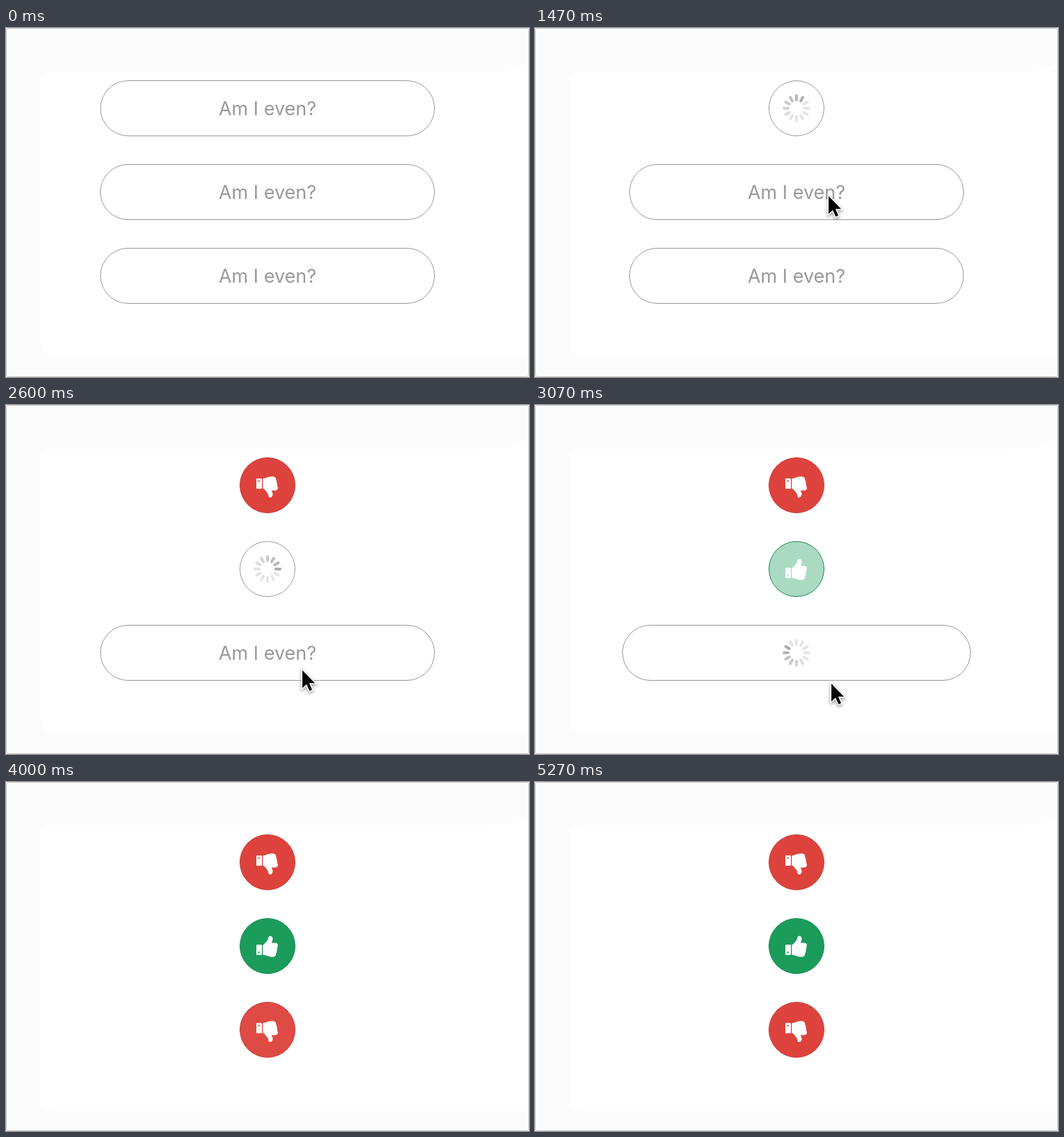
An HTML page with a canvas that plays this animation: 750x500 px, repeating every 5.34 s.

```html
<!DOCTYPE html>
<html lang="en">
<head>
<meta charset="utf-8">
<title>Am I even?</title>
<style>
  html, body { margin: 0; width: 100%; height: 100%; overflow: hidden; background: #fff; }
  canvas { display: block; }
</style>
</head>
<body>
<canvas id="stage" width="750" height="500"></canvas>
<script>
const ctx = document.getElementById('stage').getContext('2d');
const LOOP = 5340;
const GRAY = '#999999';
const RED = { fill: '221,67,60', border: '#c93a34', down: true };
const GREEN = { fill: '27,156,91', border: '#178a50', down: false };

// grow: extra width just before the button collapses; phase: spinner head offset
const buttons = [
  { y: 115, press: 1030, done: 1950, grow: 40, phase: 8.2, result: RED },
  { y: 235, press: 1990, done: 2960, grow: 0, phase: 8.2, result: GREEN },
  { y: 355, press: 2860, done: 3715, grow: 49, phase: 9.8, result: RED }
];

// time, x, y of the pointer tip
const pointerPath = [
  [600, 419, 45], [735, 420, 94], [860, 420, 94], [1000, 419, 114], [1150, 419, 114],
  [1400, 421, 232], [1500, 421, 243], [2150, 421, 243], [2550, 425, 380],
  [2950, 425, 380], [3330, 425, 460], [3400, 425, 500]
];

const arrow = new Path2D('M0 0V25.5L6 20L10.2 29.5L14 28L9.8 18.5H18Z');
const cuff = new Path2D('M-14.8-2H-9.2Q-8-2-8-.8V11.6Q-8 12.8-9.2 12.8H-14.8Q-16 12.8-16 11.6V-.8Q-16-2-14.8-2Z' +
  'M-11.1 9.1A1.2 1.2 0 1 0-13.5 9.1A1.2 1.2 0 1 0-11.1 9.1Z');
const hand = new Path2D('M-6.7-.9Q-6.7-2-5.6-2.1C-4.4-2.5-2-5.8-.2-7.9C1.2-9.2 1-12 1.9-13.4' +
  'Q2.4-14.4 3.2-14.4C6.8-14.2 7.5-12 7.5-9.5C7.5-7.2 6-6 5.8-4.5H11.2Q14.9-4.2 14.9-.8Q14.9 1 13.8 2.1' +
  'Q14.7 4.8 13.3 6.3Q13.8 9 12.2 10.4C12.4 14 10.5 15.4 7.5 15.4H5C1.5 15.4-2.5 12.9-5.6 12.8Q-6.7 12.6-6.7 11.6Z');

const clamp = v => Math.min(1, Math.max(0, v));
const smooth = v => { v = clamp(v); return v * v * (3 - 2 * v); };
const mix = (a, b, k) => a + (b - a) * k;

function drawBackground() {
  ctx.fillStyle = '#fcfcfc';
  ctx.fillRect(0, 0, 750, 500);
  ctx.fillStyle = '#fff';
  ctx.fill(new Path2D('M50 80Q50 63 72 63H680Q730 62 750 50V470H72Q50 468 50 455Z'));
  ctx.strokeStyle = '#c8c8c8';
  ctx.lineWidth = 1;
  ctx.beginPath();
  ctx.roundRect(.5, .5, 749, 499, 3);
  ctx.stroke();
}

function drawSpinner(t, phase) {
  const head = Math.floor(t * .012 + phase);
  ctx.lineWidth = 4;
  ctx.lineCap = 'round';
  for (let i = 0; i < 12; i++) {
    const age = ((head - i) % 12 + 12) % 12;
    const shade = Math.round(mix(172, 229, clamp(age / 6)));
    const angle = (i - 3) * Math.PI / 6;
    const c = Math.cos(angle), s = Math.sin(angle);
    ctx.strokeStyle = `rgb(${shade},${shade},${shade})`;
    ctx.beginPath();
    ctx.moveTo(12 * c, 12 * s);
    ctx.lineTo(18 * c, 18 * s);
    ctx.stroke();
  }
}

function drawThumb(down) {
  if (down) {
    ctx.translate(0, 3);
    ctx.scale(1, -1);
  }
  ctx.fillStyle = '#fff';
  ctx.fill(cuff, 'evenodd');
  ctx.fill(hand);
}

function buttonWidth(age, grow) {
  const wide = 480 + grow * smooth((age - 80) / 100);
  return mix(wide, 80, smooth((age - 180) / 200));
}

function drawButton(b, t) {
  const age = t - b.press;
  const dip = clamp(age / 80) * (1 - smooth((age - 80) / 100));
  const width = buttonWidth(age, b.grow);
  const finished = t >= b.done;
  ctx.save();
  ctx.translate(375, b.y);
  ctx.scale(1 - .02 * dip, 1 - .02 * dip);
  ctx.beginPath();
  ctx.roundRect(-width / 2 + .5, -39.5, width - 1, 79, Math.min(39.5, (width - 1) / 2));
  ctx.fillStyle = finished ? `rgba(${b.result.fill},${clamp((t - b.done) / 300)})` : '#fff';
  ctx.fill();
  ctx.strokeStyle = finished ? b.result.border : GRAY;
  ctx.lineWidth = 1;
  ctx.stroke();
  if (finished) {
    drawThumb(b.result.down);
  } else if (age >= 70) {
    drawSpinner(t, b.phase);
  } else {
    ctx.fillStyle = GRAY;
    ctx.font = '27px Inter, sans-serif';
    ctx.textAlign = 'center';
    ctx.fillText('Am I even?', 0, 10);
  }
  ctx.restore();
}

function drawPointer(t) {
  const next = pointerPath.findIndex(p => p[0] > t);
  if (next < 1) return;
  const [t0, x0, y0] = pointerPath[next - 1];
  const [t1, x1, y1] = pointerPath[next];
  const k = smooth((t - t0) / (t1 - t0));
  ctx.save();
  ctx.translate(mix(x0, x1, k), mix(y0, y1, k));
  ctx.lineJoin = 'miter';
  ctx.lineWidth = 3;
  ctx.strokeStyle = '#fff';
  ctx.shadowColor = 'rgba(0,0,0,.45)';
  ctx.shadowBlur = 4;
  ctx.shadowOffsetY = 2;
  ctx.stroke(arrow);
  ctx.shadowColor = 'transparent';
  ctx.fillStyle = '#000';
  ctx.fill(arrow);
  ctx.restore();
}

function draw(now) {
  const t = now % LOOP;
  drawBackground();
  buttons.forEach(b => drawButton(b, t));
  drawPointer(t);
  requestAnimationFrame(draw);
}
draw(0);
</script>
</body>
</html>
```
